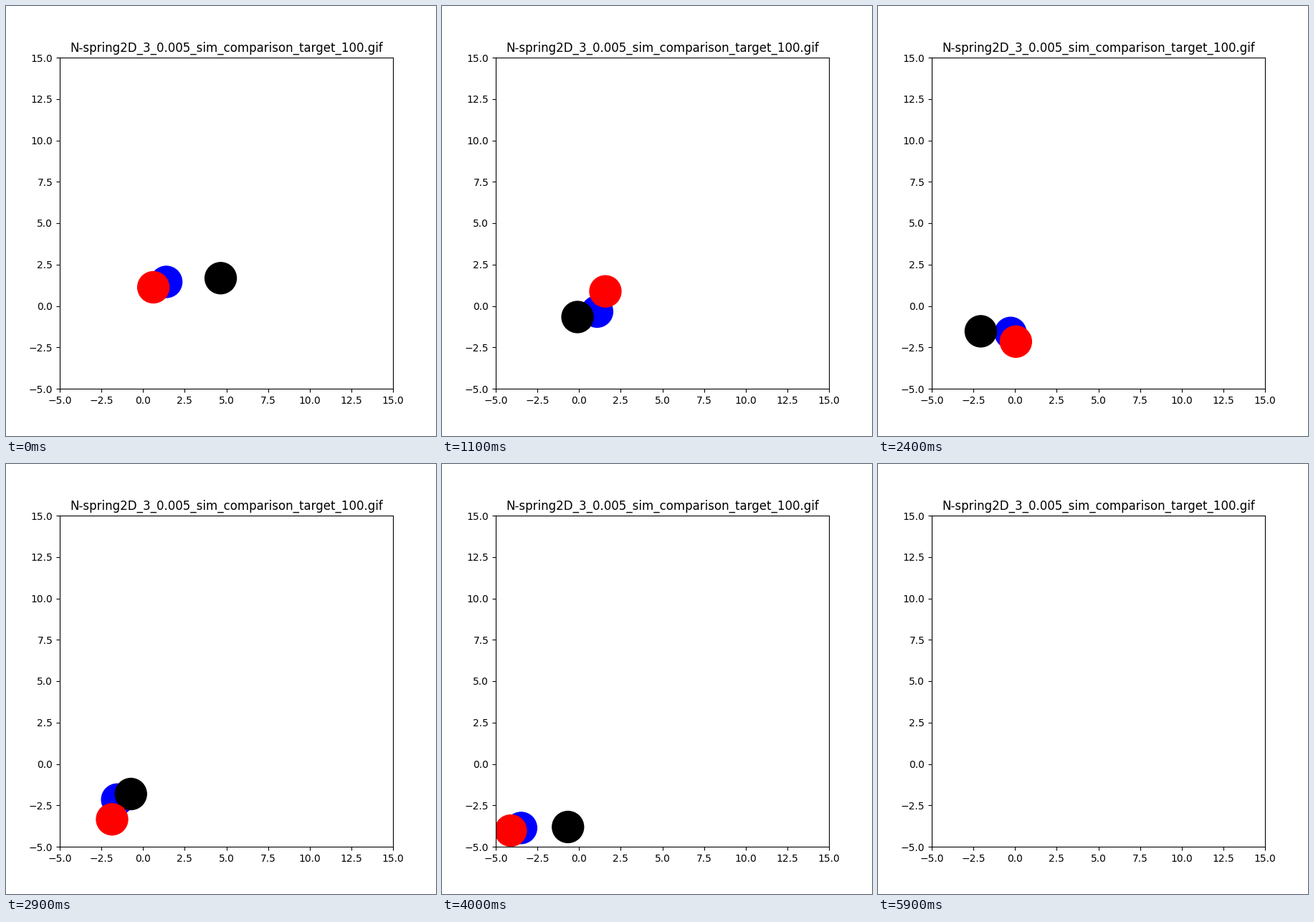
These frames come from a looping animation (600 by 600 pixels, 8.15 s). A matplotlib script:

```python
import numpy as np
import matplotlib.pyplot as plt
from matplotlib.animation import FuncAnimation

INTERVAL = 50          # ms per animation frame
FRAMES = 163
STEP_MS = 100
LAST_STEP = 59         # all balls have left the axes by then
SUBSTEPS = 6
STIFFNESS = 0.0146
COLORS = ["blue", "black", "red"]

# Key poses of the three balls; unknown coordinates are nan
TIMES = np.array([0, 6, 16, 24, 35, 46])
POSES = np.array([
    [(1.400, 1.450), (4.660, 1.675), (0.613, 1.126)],
    [(1.034, 0.411), (2.505, 0.281), (0.892, 1.169)],
    [(0.987, -0.909), (-2.075, -1.234), (1.796, 0.022)],
    [(-0.269, -1.623), (-2.054, -1.537), (0.041, -2.156)],
    [(-2.914, -3.009), (0.204, -2.675), (-3.680, -4.026)],
    [(-3.520, np.nan), (-3.430, np.nan), (-3.525, -3.961)],
])


def accel(x, k, rest):
    """Springs between every pair of equal masses, for a batch of systems."""
    d = x[:, None] - x[:, :, None]
    r = np.sqrt((d ** 2).sum(-1) + 1e-6)
    return k * ((1 - rest / r)[..., None] * d).sum(2)


def simulate(params, steps):
    """Rows of params: positions, velocities per ten steps, stiffness, rest."""
    x = params[:, :6].reshape(-1, 3, 2)
    v = params[:, 6:12].reshape(-1, 3, 2) / 10
    k = STIFFNESS * params[:, 12, None, None]
    rest = params[:, 13, None, None]
    h = 1 / SUBSTEPS
    path = [x]
    a = accel(x, k, rest)
    for _ in range(steps):
        for _ in range(SUBSTEPS):
            v = v + a * h / 2
            x = x + v * h
            a = accel(x, k, rest)
            v = v + a * h / 2
        path.append(x)
    return np.array(path)


def first_guess():
    a = accel(POSES[:2], STIFFNESS, np.ones((1, 1, 1)))
    t = TIMES[1]
    v = (POSES[1] - POSES[0]) / t - t * (2 * a[0] + a[1]) / 6
    return np.concatenate([POSES[0].ravel(), 10 * v.ravel(), [1, 1]])


def fit(guess):
    """Damped least squares through ever more of the key poses."""
    p, eps = guess, 1e-5
    nudges = np.vstack([np.zeros(len(p)), eps * np.eye(len(p))])
    for count in range(2, len(TIMES) + 1):
        times = TIMES[:count]

        def residuals(batch):
            path = simulate(batch, times[-1])
            miss = np.nan_to_num(path[times] - POSES[:count, None])
            miss = miss.swapaxes(0, 1).reshape(len(batch), -1)
            return np.hstack([miss, 0.01 * (batch - guess)])

        damping = 0.01
        res = residuals(p + nudges)
        for _ in range(14):
            jac = (res[1:] - res[0]).T / eps
            normal = jac.T @ jac + damping * np.eye(len(p))
            trial = p - np.linalg.solve(normal, jac.T @ res[0])
            new = residuals(trial + nudges)
            if (new[0] ** 2).sum() < (res[0] ** 2).sum():
                p, res, damping = trial, new, damping / 5
            else:
                damping *= 6
    return p


path = simulate(fit(first_guess())[None], LAST_STEP)[:, 0]

fig, ax = plt.subplots(figsize=(6, 6), dpi=100)
balls = ax.scatter(*path[0].T, s=1000, c=COLORS)
ax.set_xlim(-5, 15)
ax.set_ylim(-5, 15)
ax.set_title("N-spring2D_3_0.005_sim_comparison_target_100.gif")


def update(frame):
    balls.set_offsets(path[min(frame * INTERVAL // STEP_MS, LAST_STEP)])
    return [balls]


anim = FuncAnimation(fig, update, frames=FRAMES, interval=INTERVAL,
                     repeat=True, repeat_delay=0)
plt.show()
```
